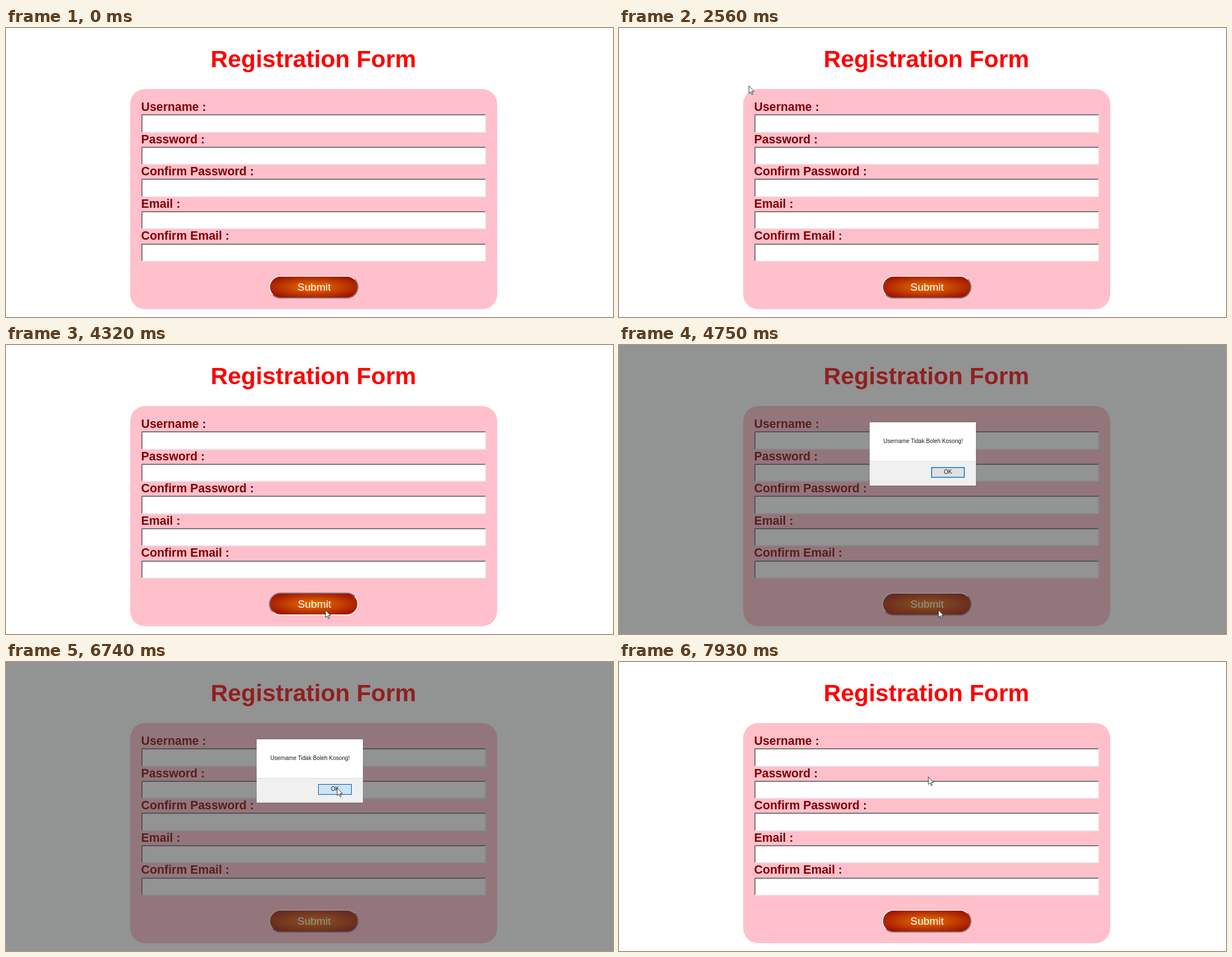
Write an HTML page that moves like this. It is 1085 px wide and 516 px high and loops after 8 s.

```html
<!DOCTYPE html>
<html lang="en">
<head>
<meta charset="utf-8">
<title>Registration Form</title>
<style>
  html, body { margin: 0; width: 100%; height: 100%; overflow: hidden; background: #fff; }
  body { position: relative; font-family: "Liberation Sans", Arial, sans-serif; cursor: default; }
  body * { box-sizing: border-box; }
  h1 {
    position: absolute; left: 0; top: 30px; width: 1099px; margin: 0;
    font-size: 42.67px; line-height: 50px; text-align: center; color: red;
  }
  .panel {
    position: absolute; left: 221.6px; top: 109px; width: 656px; height: 393px;
    padding: 20px; border-radius: 26.67px; background: pink;
  }
  .label { height: 25.2px; font-weight: bold; font-size: 21.33px; line-height: 25.2px; color: maroon; }
  .field {
    height: 32.4px; background: #fff; border: 2px solid;
    border-color: #767676 #ececec #ececec #767676; border-radius: 2px;
  }
  .submit {
    position: absolute; left: 470px; top: 442px; width: 160px; height: 41px;
    border: 2px solid; border-color: #f4f0f0 #86787c #86787c #f4f0f0; border-radius: 21px;
    background: radial-gradient(#ea7500, #940000);
    font-size: 19.2px; line-height: 37px; text-align: center; text-indent: 1.4px; color: #fff;
  }
  .submit.down { border-color: #86787c #f4f0f0 #f4f0f0 #86787c; text-indent: 2.8px; }
  .modal { position: absolute; inset: 0; background: rgba(56, 58, 58, .545); visibility: hidden; }
  .modal.open { visibility: visible; }
  .dialog {
    position: absolute; left: 448px; top: 138px; width: 190px; height: 113px;
    background: linear-gradient(#fff 69px, #dfdfdf 69px 70px, #f0f0f0 70px);
    font-size: 10.1px; color: #1c1c1c; text-align: center;
    box-shadow: 0 0 0 1px rgba(70, 70, 70, .15);
  }
  .message { position: absolute; left: 0; top: 23.5px; width: 191px; line-height: 20px; }
  .ok {
    position: absolute; left: 110px; top: 80px; width: 60px; height: 19px;
    background: #e1e1e1; box-shadow: inset 0 0 0 1.6px #0078d7; line-height: 18px;
  }
  .ok.hover { background: #e5f1fb; box-shadow: inset 0 0 0 1px #0078d7; }
  .ok.down { background: #cce4f7; box-shadow: inset 0 0 0 1px #005499; }
  .pointer { position: absolute; left: 0; top: 0; width: 12px; height: 18px; overflow: visible; visibility: hidden; }
</style>
</head>
<body>
<h1>Registration Form</h1>
<div class="panel">
  <div class="label">Username :</div><div class="field"></div>
  <div class="label">Password :</div><div class="field"></div>
  <div class="label">Confirm Password :</div><div class="field"></div>
  <div class="label">Email :</div><div class="field"></div>
  <div class="label">Confirm Email :</div><div class="field"></div>
</div>
<div class="submit">Submit</div>
<div class="modal">
  <div class="dialog">
    <div class="message">Username Tidak Boleh Kosong!</div>
    <div class="ok">OK</div>
  </div>
</div>
<svg class="pointer">
  <path id="arrow" d="M0 0V13.6L3.1 10.7 5.2 15.7 7.2 14.8 5.1 10H9.3Z" fill="#fff" stroke="#111" stroke-width=".85"/>
  <path id="beam" d="M-1.5 -5.5H3.5M1 -5.5V6.5M-1.5 6.5H3.5" fill="none" stroke="#222" stroke-width=".95"/>
</svg>
<script>
const LOOP = 8000, TICK = 107;
const PRESS = 4320, OPEN = 4750, OK_DOWN = 6740, CLOSE = 6850;

// The pointer travels from one rest point to the next, bent towards an optional control point.
const entry = { x: 673, y: 508 };
const moves = [
  { from: 1370, until: 2110, x: 393, y: 280 },
  { from: 2220, until: 3000, x: 620, y: 417, bend: { x: -42, y: -142 } },
  { from: 3150, until: 3890, x: 571, y: 473, bend: { x: 711, y: 206 } },
  { from: 5570, until: 5950, x: 598, y: 250 },
  { from: 6090, until: 6340, x: 592, y: 225 },
  { from: 7650, until: 7930, x: 553, y: 205 }
];

const $ = q => document.querySelector(q);
const submit = $('.submit'), modal = $('.modal'), ok = $('.ok');
const pointer = $('.pointer'), arrow = $('#arrow'), beam = $('#beam');
const show = (el, on) => { el.style.display = on ? '' : 'none'; };
const mix = (a, b, f) => ({ x: a.x + (b.x - a.x) * f, y: a.y + (b.y - a.y) * f });

function progress({ from, until }, t) {
  const gaps = Math.round((until - from) / TICK);
  const step = Math.floor((t - from) / (until - from) * gaps + 1e-6) + 1;
  return Math.min(step / (gaps + 1), 1);
}

function position(t) {
  const i = moves.filter(m => m.from <= t).length - 1;
  if (i < 0) return null;
  const start = moves[i - 1] || entry, end = moves[i];
  const bend = end.bend || mix(start, end, .5);
  const f = progress(end, t);
  return mix(mix(start, bend, f), mix(bend, end, f), f);
}

function overField({ x, y }) {
  const row = (y - 129) % 57.6;
  return x > 242 && x < 858 && y > 129 && y < 417 && row > 25.2;
}

const overOk = ({ x, y }) => x > 558 && x < 618 && y > 218 && y < 237;

function draw(t) {
  const open = t >= OPEN && t < CLOSE;
  submit.classList.toggle('down', t >= PRESS && t < OPEN);
  modal.classList.toggle('open', open);

  const p = position(t);
  pointer.style.visibility = p ? 'visible' : 'hidden';
  if (!p) return;
  const text = !open && overField(p);
  show(beam, text);
  show(arrow, !text);
  pointer.style.transform = `translate(${p.x}px, ${p.y}px)`;
  ok.classList.toggle('hover', open && overOk(p));
  ok.classList.toggle('down', open && t >= OK_DOWN);
}

const begin = performance.now();
function tick() {
  draw((performance.now() - begin) % LOOP);
  requestAnimationFrame(tick);
}
tick();
</script>
</body>
</html>
```
